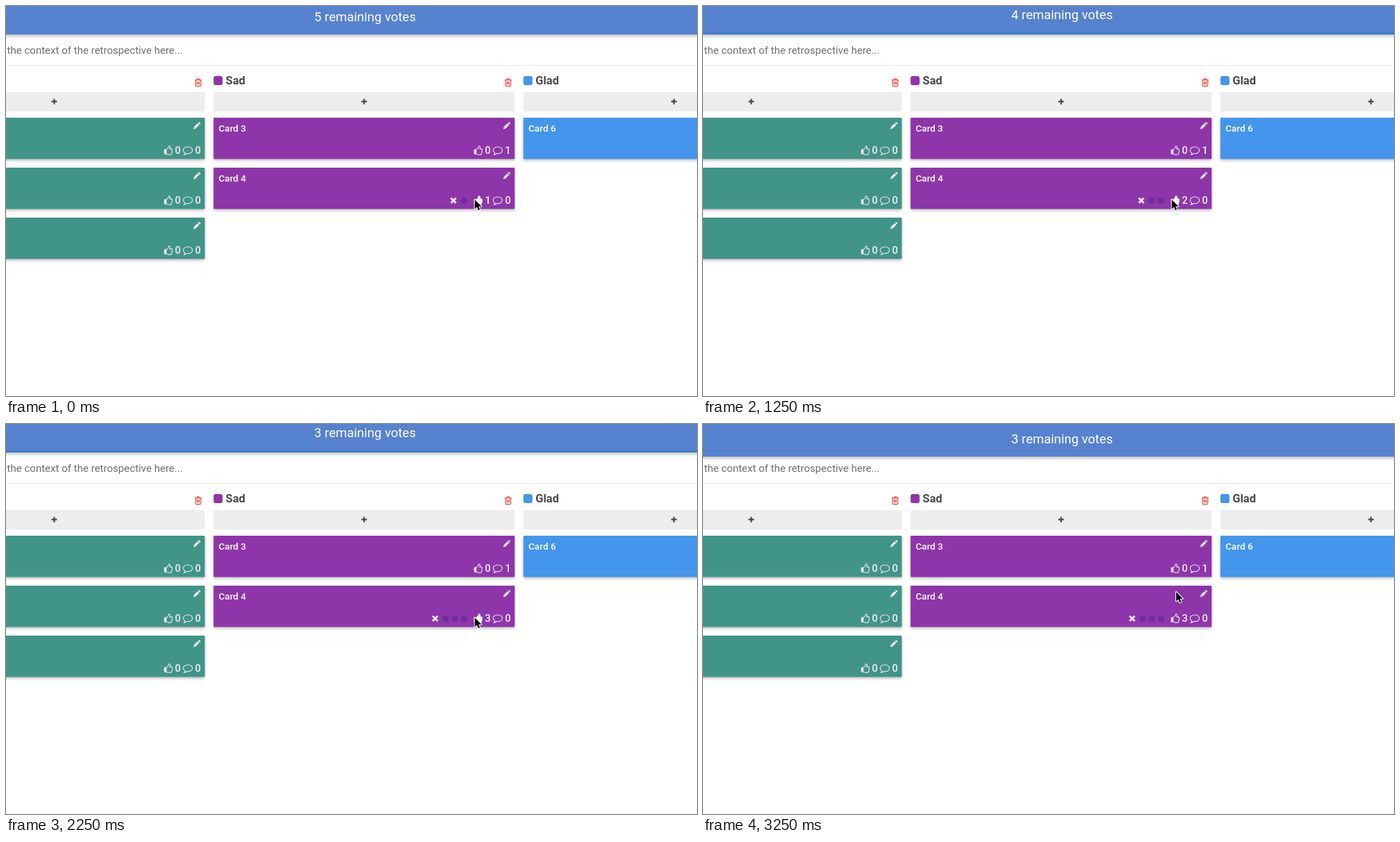
Write an HTML page with a canvas that moves like this. It is 996 px wide and 562 px high and loops after 3.5 s.

```html
<!DOCTYPE html>
<html lang="en">
<head>
<meta charset="utf-8">
<title>Retrospective board</title>
<style>
  html, body { margin: 0; width: 100%; height: 100%; overflow: hidden; background: #fff; }
  canvas { display: block; width: 996px; height: 562px; }
</style>
</head>
<body>
<canvas id="stage" width="996" height="562"></canvas>
<script>
const W = 996, H = 562, LOOP = 3500;
const ctx = document.getElementById('stage').getContext('2d');

const COL_W = 434, ROW = 72, CARD_TOP = 161, CARD_H = 59.6;
const ICON = '#f3eff6';
const columns = [
  { x: -147.5, color: '#419488', name: '', cards: ['', '', ''] },
  { x: 299.2, color: '#8e35aa', name: 'Sad', cards: ['Card 3', 'Card 4'] },
  { x: 745.8, color: '#4495ec', name: 'Glad', cards: ['Card 6'] }
];

// Header lift is how far the bar has slid up; the label may slide further.
const steps = [
  { at: 0, votes: 1, lift: 6, label: 6 },
  { at: 250, votes: 1, lift: 0, label: 0 },
  { at: 1250, votes: 2, lift: 6, label: 9, edge: true },
  { at: 1500, votes: 2, lift: 0, label: 0 },
  { at: 2250, votes: 3, lift: 6, label: 9, edge: true },
  { at: 2500, votes: 3, lift: 0, label: 0 },
  { at: 3250, votes: 3, lift: 0, label: 0, away: true }
];

const hand = new Path2D('M4 5.5C5.2 5.3 6 3.9 6.5 3.3C7.2 2.5 7.1 .5 7.8 .5' +
  'C9 .5 9.5 1.2 9.5 2.5C9.5 3.4 8.8 4 8.75 4.5H11C12 4.5 12.5 5.3 12.5 6' +
  'C12.5 6.7 12.2 7 12 7.3C12.5 8.2 12.1 9 11.8 9.3C12 10.1 11.7 10.6 11.4 10.8' +
  'C11.5 12 10.6 12.5 9.4 12.5H8.5C6.8 12.5 5.4 11.5 4 11.5Z');
const cuff = new Path2D('M4 5H2Q1 5 1 6V11Q1 12 2 12H4ZM3 10.5A.5 .5 0 1 0 2 10.5A.5 .5 0 1 0 3 10.5Z');
const bubble = new Path2D('M7 1.5C10.6 1.5 13.4 3.6 13.4 6.2S10.6 10.9 7 10.9' +
  'C6.4 10.9 5.8 10.8 5.2 10.7C4.2 11.7 3.1 12.1 1.9 12.3C2.6 11.6 2.9 10.8 3 9.9' +
  'C1.5 9 .6 7.7 .6 6.2C.6 3.6 3.4 1.5 7 1.5Z');
const pencil = new Path2D('M0 11L.8 7.7L6.4 2.1L8.9 4.6L3.3 10.2ZM7.1 1.4L8.1 .4Q8.7 -.1 9.3 .4' +
  'L10.6 1.7Q11.1 2.3 10.6 2.9L9.6 3.9ZM1.6 8.3L1.2 9.8L2.7 9.4Z');
const bin = new Path2D('M.3 2.6H10.3M3.4 2.4L4 .8H6.6L7.2 2.4M1.5 2.8V10.6Q1.5 11.6 2.5 11.6' +
  'H8.1Q9.1 11.6 9.1 10.6V2.8M3.6 4.8V9.6M5.3 4.8V9.6M7 4.8V9.6');
const arrow = new Path2D('M0 0V13.4L3.1 10.5L5.1 15.3L7.4 14.3L5.4 9.7H9.7Z');

function at(x, y, scale, draw) {
  ctx.save();
  ctx.translate(x, y);
  ctx.scale(scale, scale);
  draw();
  ctx.restore();
}

function text(str, x, y, font, color, align = 'left') {
  ctx.font = font + ' Roboto, sans-serif';
  ctx.fillStyle = color;
  ctx.textAlign = align;
  ctx.fillText(str, x, y);
}

function box(x, y, w, h, r, color) {
  ctx.fillStyle = color;
  ctx.beginPath();
  ctx.roundRect(x, y, w, h, r);
  ctx.fill();
}

function shadowed(blur, offset, alpha, draw) {
  ctx.save();
  ctx.shadowColor = `rgba(0,0,0,${alpha})`;
  ctx.shadowBlur = blur;
  ctx.shadowOffsetY = offset;
  draw();
  ctx.restore();
}

function thumb(x, y, solid) {
  at(x, y, 1.04, () => {
    ctx.fillStyle = ctx.strokeStyle = ICON;
    ctx.lineJoin = 'round';
    ctx.fill(cuff, 'evenodd');
    if (solid) ctx.fill(hand);
    ctx.stroke(hand);
  });
}

function cross(x, y, arm, angle, width, color) {
  at(x, y, 1, () => {
    ctx.rotate(angle);
    ctx.strokeStyle = color;
    ctx.lineWidth = width;
    ctx.beginPath();
    ctx.moveTo(-arm, 0);
    ctx.lineTo(arm, 0);
    ctx.moveTo(0, -arm);
    ctx.lineTo(0, arm);
    ctx.stroke();
  });
}

function card(x, y, color, label, likes, notes, solid) {
  shadowed(4, 2, 0.28, () => box(x, y, COL_W, CARD_H, 1, color));
  text(label, x + 7.2, y + 20, '500 13.6px', '#fff');
  at(x + 417.6, y + 6, 0.95, () => {
    ctx.fillStyle = ICON;
    ctx.fill(pencil, 'evenodd');
  });
  thumb(x + 374.3, y + 40.2, solid);
  at(x + 402.3, y + 40.4, 1.04, () => {
    ctx.strokeStyle = ICON;
    ctx.stroke(bubble);
  });
  text(likes, x + 395.2, y + 52.2, '500 14.8px', ICON, 'center');
  text(notes, x + 424.2, y + 52.2, '500 14.8px', ICON, 'center');
}

function ownVotes(count) {
  for (let i = 0; i < count; i++) {
    ctx.fillStyle = '#722c9e';
    ctx.beginPath();
    ctx.arc(660.2 - i * 13.2, 280.5, 4.7, 0, 7);
    ctx.fill();
  }
  cross(658.2 - count * 13.2, 280.3, 5.2, Math.PI / 4, 2.8, ICON);
}

function column({ x, color, name, cards }, step) {
  box(x, 101, 13, 13, 3, color);
  text(name, x + 17.4, 113.2, '700 16.5px', '#484848');
  at(x + 419.3, 104, 1, () => {
    ctx.strokeStyle = '#e5493f';
    ctx.lineWidth = 1.15;
    ctx.stroke(bin);
  });
  box(x, 124, COL_W, 28, 2, '#ededed');
  cross(x + 217, 137.7, 4, 0, 2.2, '#484848');
  cards.forEach((label, i) => {
    const voted = label === 'Card 4';
    card(x, CARD_TOP + i * ROW, color, label, voted ? step.votes : 0,
      label === 'Card 3' ? 1 : 0, voted && !step.away);
  });
}

function header(step) {
  const h = 47 - step.lift;
  shadowed(5, 2, 0.3, () => box(-10, -10, W + 20, h + 10, 0, '#5682d0'));
  if (step.edge) box(0, h - 3, W, 3, 0, '#3b7ccb');
  text(`${6 - step.votes} remaining votes`, 517.5, 28.2 - step.label, '400 18.5px', '#fff', 'center');
}

function pointer(x, y) {
  at(x, y, 1, () => {
    ctx.lineWidth = 2;
    ctx.lineJoin = 'round';
    ctx.strokeStyle = '#fff';
    ctx.stroke(arrow);
    ctx.fillStyle = '#000';
    ctx.fill(arrow);
  });
}

function render(now) {
  const t = now % LOOP;
  const step = steps.findLast(s => t >= s.at) || steps[0];
  ctx.fillStyle = '#fff';
  ctx.fillRect(0, 0, W, H);
  text('the context of the retrospective here...', 1.5, 69, '400 15.05px', '#6e6e6e');
  box(0, 85, W, 1, 0, '#e9e9e9');
  columns.forEach(c => column(c, step));
  ownVotes(step.votes);
  header(step);
  if (step.away) pointer(682, 242);
  else pointer(675.7, 279);
}

const start = performance.now();
function tick() {
  render(performance.now() - start);
  requestAnimationFrame(tick);
}
tick();
</script>
</body>
</html>
```
